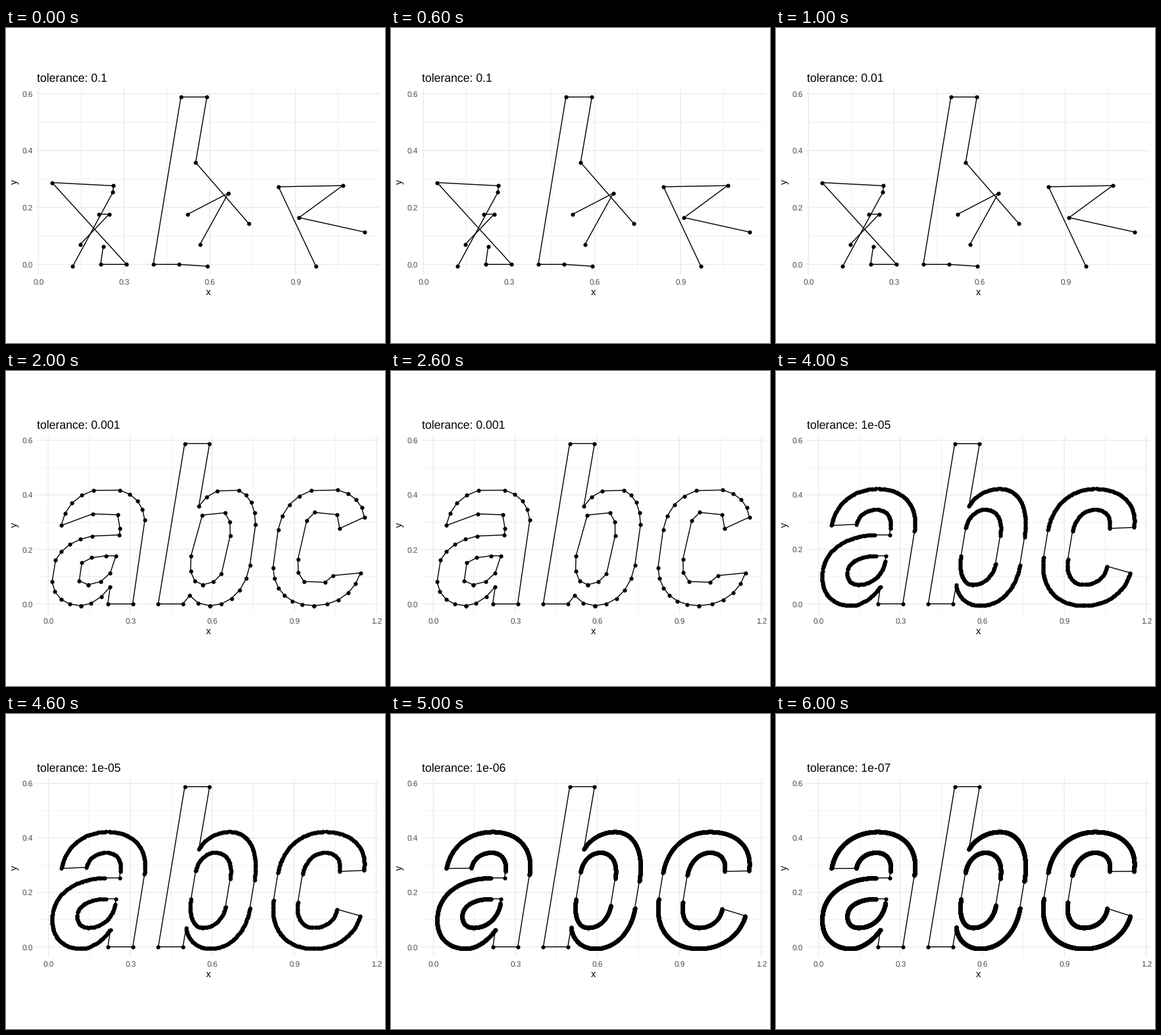
Recreate the animation shown at these times as a matplotlib script. Size 576x480 px, loop 7 s.

```python
import numpy as np
import matplotlib
import matplotlib.pyplot as plt
from matplotlib.animation import FuncAnimation

matplotlib.rcParams["font.family"] = "Liberation Sans"
matplotlib.rcParams["text.hinting"] = "none"

W, H, DPI = 576, 480, 96
PX = 72 / DPI                            # points per pixel
LEFT, RIGHT, MIDDLE = 46.3, 568.3, 234.1  # plot panel
GRID, GREY = "#EBEBEB", "#4D4D4D"

# Letters are designed upright in thousandths of an em, then slanted.
SLANT = 0.1646
LOW, HIGH, ASCENT = -6.5, 422.4, 588     # outer extremes
IN_LOW, IN_HIGH = 70.5, 346.3            # counter extremes
ROUND = 0.6                              # pull of a curve towards its corner


def flat(x, y):
    """Knot where the outline runs horizontally."""
    return x, y, None


def side(x, y, lean=0):
    """Knot where the outline runs upright, or leans by dx/dy."""
    return x, y, lean


# A contour is a list of strokes joined by straight lines. Within a stroke,
# flat and side knots alternate, each pair spanning one curve.
A_OUTER = [
    [flat(121, LOW), side(-5, 125), flat(170, 253)],
    [side(218.8, 253)],
    [side(217.1, 276.2), flat(154.4, IN_HIGH), side(90.6, 287.4)],
    [side(0.3, 287.4), flat(146.6, HIGH), side(307.8, 262)],
    [side(308.8, 0)],
    [side(217.6, 0)],
    [side(216.5, 63.3, 0.54), flat(121, LOW)],
]
A_INNER = [
    [flat(134.7, IN_LOW), side(218.8, 162)],
    [side(218.4, 176.4)],
    [flat(182.3, 176.4), side(86, 122), flat(134.7, IN_LOW)],
]
B_OUTER = [
    [flat(592.6, LOW), side(491.7, 72.9, -0.25)],
    [side(491.9, 0)],
    [side(402.2, 0)],
    [side(402.2, ASCENT)],
    [side(493.2, ASCENT)],
    [side(491.7, 358, 0.38), flat(594, HIGH), side(714, 239)],
    [side(714, 142.7), flat(592.6, LOW)],
]
B_INNER = [
    [flat(554.3, IN_LOW), side(624, 153.5)],
    [side(624, 250.3), flat(554.3, IN_HIGH), side(493, 271.5)],
    [side(493, 175.7), flat(554.3, IN_LOW)],
]
C_OUTER = [
    [flat(972.9, LOW), side(795.8, 177.6)],
    [side(795.8, 272.7), flat(943.2, HIGH), side(1108.7, 276.8)],
    [side(1020.1, 276.8), flat(955.7, IN_HIGH), side(886, 260.6)],
    [side(886, 164.4), flat(960.2, IN_LOW), side(1034, 141.5)],
    [side(1122.8, 113.8, 0.12), flat(972.9, LOW)],
]
CONTOURS = [A_OUTER, A_INNER, B_OUTER, B_INNER, C_OUTER]


def curve(a, b, step, jitter, rng):
    """Interior points of the curve from a to b, about `step` apart."""
    level, lean = (a, b) if a[2] is None else (b, a)
    y = level[1]
    corner = np.array([lean[0] + lean[2] * (y - lean[1]), y])
    p, q = np.array(a[:2]), np.array(b[:2])
    arms = np.hypot(*(corner - p)) + np.hypot(*(q - corner))
    n = max(1, round((2 * np.hypot(*(q - p)) + arms) / 3 / step))
    t = np.arange(1, n) + rng.uniform(-jitter, jitter, n - 1)
    t = t[:, None] / n
    s = 1 - t
    p1, q1 = p + ROUND * (corner - p), q + ROUND * (corner - q)
    return s**3 * p + 3 * s * s * t * p1 + 3 * s * t * t * q1 + t**3 * q


def outline(contour, tol, rng):
    """Points kept at a tolerance; a coarse one drops curves altogether."""
    fine = tol < 0.005
    step = 44.5 * np.sqrt(tol / 0.001)
    jitter = 0.3 if tol < 0.0005 else 0
    parts = []
    for stroke in contour:
        parts.append([stroke[0][:2]])
        if fine:
            parts += [curve(a, b, step, jitter, rng)
                      for a, b in zip(stroke, stroke[1:])]
    if fine:
        parts.append(parts[0])
    x, y = np.vstack(parts).T
    return np.column_stack([x + SLANT * y, y]) / 1000


fig = plt.figure(figsize=(W / DPI, H / DPI), dpi=DPI, facecolor="white")
ax = fig.add_axes([0, 0, 1, 1])


def rule(xs, ys, width):
    ax.plot(xs, ys, color=GRID, lw=width * PX, solid_capstyle="butt",
            snap=False)


def label(x, y, text, size, ha="center", color="black"):
    ax.text(x, y, text, size=size, ha=ha, va="baseline", color=color)


def draw_grid(zero, scale, top, bottom):
    for k in sorted(range(9), key=lambda k: k % 2 == 0):   # minor lines first
        major = k % 2 == 0
        width = 1.42 if major else 0.71
        x, y = zero[0] + 0.15 * k * scale, zero[1] - 0.1 * k * scale
        if x < RIGHT:
            rule((x, x), (top, bottom), width)
            if major:
                label(x + 0.5, round(bottom + 15), f"{0.15 * k:.1f}", 8.8,
                      color=GREY)
        if y > top:
            rule((LEFT, RIGHT), (y, y), width)
            if major:
                label(40.4, y + 4.6, f"{0.1 * k:.1f}", 8.8, "right", GREY)


def draw(i):
    tol = 10.0 ** -(i + 1)
    rng = np.random.default_rng(4)
    paths = [outline(c, tol, rng) for c in CONTOURS]

    # Equal scales on both axes, with 5 % of room around the data.
    points = np.vstack(paths)
    low, size = points.min(axis=0), np.ptp(points, axis=0)
    scale = (RIGHT - LEFT) / (1.1 * size[0])
    half = 0.55 * size[1] * scale
    top, bottom = MIDDLE - half, MIDDLE + half
    start = (low - 0.05 * size) * scale
    zero = LEFT - start[0], bottom + start[1]

    ax.cla()
    ax.set(xlim=(0, W), ylim=(H, 0))
    ax.axis("off")
    draw_grid(zero, scale, top, bottom)
    text = f"{tol:g}" if i < 3 else f"{tol:.0e}"
    label(47, round(top - 10), "tolerance: " + text, 13.2, "left")
    label((LEFT + RIGHT) / 2, round(bottom + 30.8), "x", 11)
    ax.text(20.8, MIDDLE, "y", size=11, rotation=90, ha="right", va="center")
    for path in paths:
        x, y = path.T * scale
        ax.plot(zero[0] + x, zero[1] - y, color="black", lw=1.42 * PX,
                marker="o", ms=6.2 * PX, mew=0, solid_capstyle="butt",
                snap=False)
    return []


anim = FuncAnimation(fig, draw, frames=7, interval=1000, repeat=True,
                     init_func=lambda: [])
plt.show()
```
